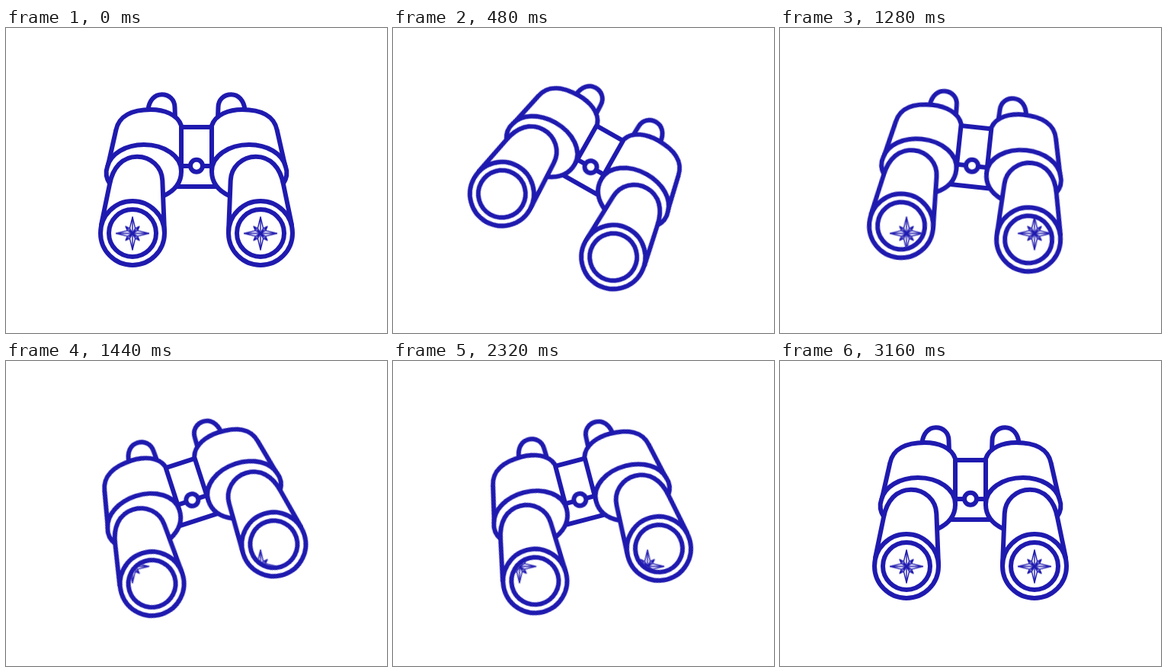
An HTML page without scripts that plays this animation: 500 by 400 pixels, repeating every 3.48 s.

```html
<!DOCTYPE html>
<html lang="en">
<head>
<meta charset="utf-8">
<title>Binoculars</title>
<style>
  html, body { margin: 0; width: 100%; height: 100%; overflow: hidden; background: #fff; }
  svg { display: block; width: 100%; height: 100%; }

  .ink { fill: #fff; stroke: #1f1aaf; stroke-width: 6; stroke-linecap: round; stroke-linejoin: round; }
  .star { fill: none; stroke: #1f1aaf; stroke-width: 1.4; stroke-linejoin: round; }

  /* --dir: -1 undoes the swing, so the stars stay put behind the moving lenses */
  .swing {
    --dir: 1;
    transform-origin: 252px 199.5px;
    animation: swing 3480ms cubic-bezier(.3333, 0, .6667, 1) infinite;
  }
  .still { --dir: -1; }
  .star { animation: twinkle 3480ms linear infinite; }

  @keyframes swing {
    0% { transform: rotate(0deg); }
    13.793%, 29.885% { transform: rotate(calc(29.5deg * var(--dir))); }
    45.977%, 58.621% { transform: rotate(calc(-29.5deg * var(--dir))); }
    74.713%, 100% { transform: rotate(0deg); }
  }
  @keyframes twinkle {
    0%, 74.713% { transform: scale(1); }
    82.759% { transform: scale(0); }
    90.805%, 100% { transform: scale(1); }
  }
</style>
</head>
<body>
<svg viewBox="0 0 500 400">
  <defs>
    <g id="half">
      <!-- eyecup, body, band, tube, lens -->
      <path d="M186.5 107C188 95 195 87.2 204.5 87.2C214 87.2 221.5 94 221.5 104L222 118"/>
      <path d="M133 184L144.3 134C148 115 166 107 190 107C207 107 225 113 230 128L230 188"/>
      <path d="M136.5 205C132 198 130 190 133 182C137 165 157 153 181 153C208 153 230 168 230 188C230 204 220 214 207 220"/>
      <path d="M125 258L136 205C140 183 153 168.7 172 168.7C190 168.7 204.5 182 205.3 200L208 268"/>
      <circle cx="166" cy="269" r="42"/>
      <circle cx="166" cy="269" r="31"/>
    </g>
    <path id="quarter" d="M0-21.5L3.6-6.6L9-9L6.6-3.6L21.5 0H0L9-9M0 0L3.6-6.6M0 0L6.6-3.6"/>
    <g id="rose">
      <use href="#quarter"/>
      <use href="#quarter" transform="rotate(90)"/>
      <use href="#quarter" transform="rotate(180)"/>
      <use href="#quarter" transform="rotate(270)"/>
    </g>
    <clipPath id="lenses">
      <circle cx="166" cy="269" r="28.5"/>
      <circle cx="334" cy="269" r="28.5"/>
    </clipPath>
  </defs>

  <g class="swing">
    <g class="ink">
      <path d="M231 130H269M231 181H269M220 208H280"/>
      <circle cx="250" cy="180.7" r="8"/>
      <use href="#half"/>
      <use href="#half" transform="matrix(-1 0 0 1 500 0)"/>
    </g>
    <g clip-path="url(#lenses)">
      <g class="swing still">
        <g transform="translate(166 269.4)"><g class="star"><use href="#rose"/></g></g>
        <g transform="translate(334 269.4)"><g class="star"><use href="#rose"/></g></g>
      </g>
    </g>
  </g>
</svg>
</body>
</html>
```
